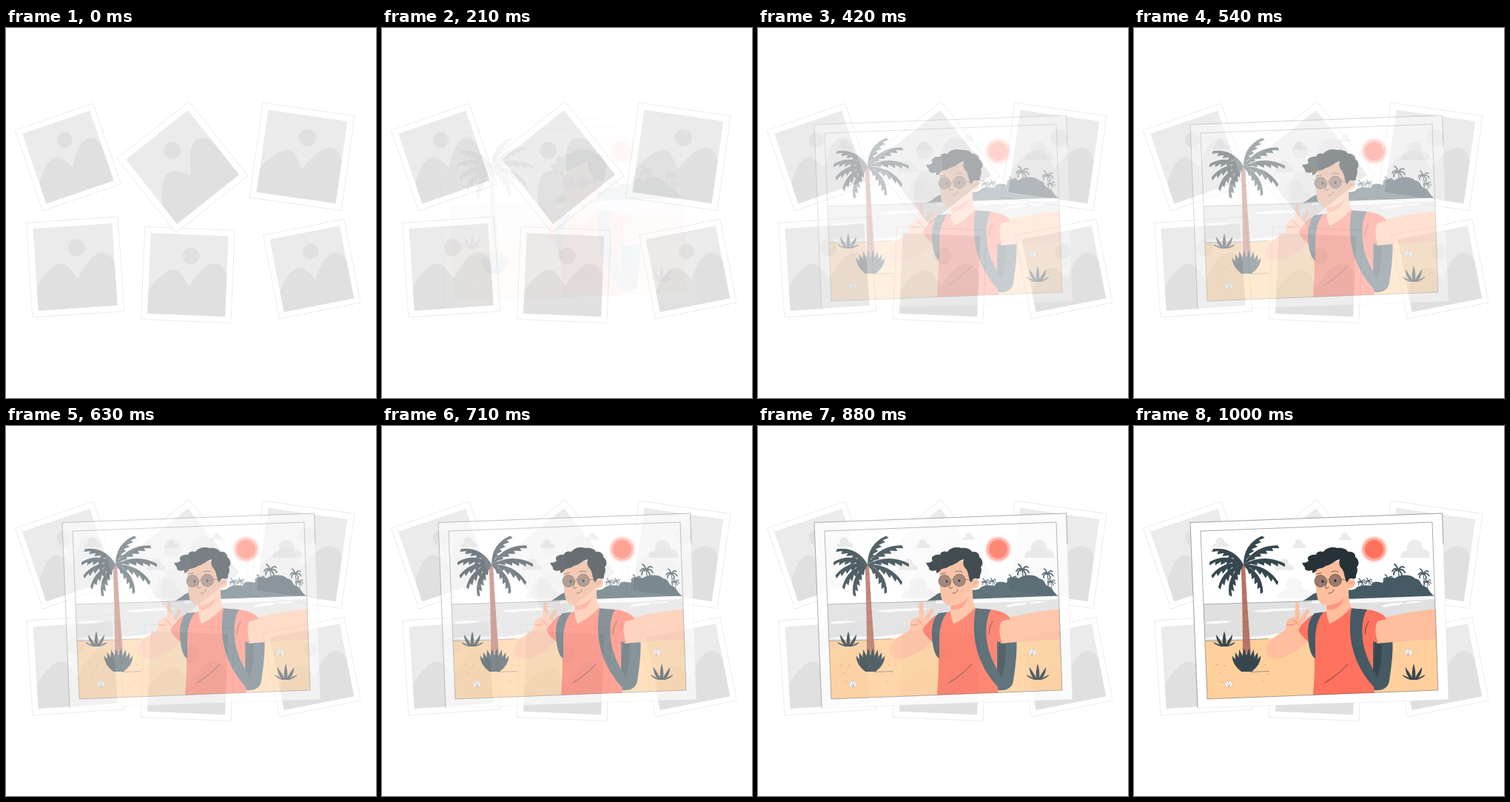
These frames come from a looping animation (500x500 px, 1040 ms). An HTML page:

```html
<!DOCTYPE html>
<html lang="en">
<head>
<meta charset="utf-8">
<title>Holiday photos</title>
<style>
  html, body { margin: 0; width: 100%; height: 100%; overflow: hidden; background: #fff; }
  svg { display: block; width: 100vw; height: 100vh; }
  #card { opacity: 0; animation: develop 1040ms linear infinite; }
  @keyframes develop {
    0% { opacity: 0; animation-timing-function: step-end; }
    19.71% { opacity: .05; animation-timing-function: steps(20, jump-none); }
    100% { opacity: 1; }
  }
  .ink { fill: #263238; }
  .leaf { fill: #37474f; }
  .slate { fill: #455a64; }
  .skin { fill: #ffbe9d; }
  .red { fill: #ff725e; }
  .line { fill: none; stroke: #263238; stroke-width: .7; stroke-linecap: round; stroke-linejoin: round; }
  .fold { stroke: #d9644f; }
  .edge { fill: none; stroke: #263238; stroke-width: .4; }
</style>
</head>
<body>
<svg viewBox="0 0 500 500" xmlns="http://www.w3.org/2000/svg">
  <defs>
    <g id="blank">
      <path d="M-62-64H62V64H-62Z" fill="#fff" stroke="#e0e0e0" stroke-width=".6"/>
      <path d="M-53.5-55.5H53.5V55.5H-53.5Z" fill="#ebebeb"/>
      <path d="M-53.5 24C-42 5-28-6-20-6C-10-6-5 6 2.5 16C12 0 24-17 37-17C46-17 51-9 53.5-2V55.5H-53.5Z" fill="#e0e0e0"/>
      <circle cx="3.4" cy="-26" r="11.5" fill="#e0e0e0"/>
    </g>
    <path id="cloud" d="M-20 12C-20 5-15 2-11 3C-12-7-8-12-1-12C7-12 10-7 10 1C16 0 20 4 20 12Z" fill="#ebebeb"/>
    <g id="tree" fill="none" stroke="#455a64" stroke-linecap="round">
      <path d="M0 0Q2 9 1 20" stroke-width="1.3"/>
      <path d="M0 0Q-4-5-8 1M0 0Q-6-1-6 6M0 0Q-2-7-5-8M0 0Q4-7 8-4M0 0Q6-3 9 3M0 0Q4 1 5 7" stroke-width="2"/>
    </g>
    <g id="shell">
      <path d="M-2 4C-7 0-5-3-3-3C-2-5 2-5 3-3C6-3 6 1 2 4Z" fill="#fff" stroke="#b8a898" stroke-width=".5"/>
      <path d="M0 4L-3-2M0 4V-4M0 4L3-2" stroke="#8c8178" stroke-width=".5"/>
    </g>
    <pattern id="hatch" width="2" height="2" patternUnits="userSpaceOnUse" patternTransform="rotate(30)">
      <path d="M0 0H2V1H0Z" fill="#ff725e"/>
    </pattern>
    <clipPath id="photo"><path d="M90 142L403 130L411 357L99 369Z"/></clipPath>
  </defs>

  <use href="#blank" transform="translate(83.8 174.5) rotate(-18.9) scale(.9)"/>
  <use href="#blank" transform="translate(400 173.8) rotate(8.1) scale(1.01)"/>
  <use href="#blank" transform="translate(93.5 323) rotate(-3.8)"/>
  <use href="#blank" transform="translate(245.8 333.5) rotate(2.4) scale(.98)"/>
  <use href="#blank" transform="translate(413.3 325.5) rotate(-11.2) scale(.9)"/>
  <use href="#blank" transform="translate(238.5 188) rotate(-38.4)"/>

  <g id="card">
    <path d="M76 130.5L416.5 118L425 369.5L86 381Z" fill="#fff" stroke="#e0e0e0" stroke-width=".5"/>
    <path class="edge" d="M86 381L76 130.5L416.5 118L418 160"/>
    <g clip-path="url(#photo)">
      <use href="#cloud" transform="translate(380 166)"/>
      <use href="#cloud" transform="translate(223 159) scale(.48)"/>
      <use href="#cloud" transform="translate(285 149) scale(.42)"/>
      <use href="#cloud" transform="translate(203 187) scale(.65)"/>
      <use href="#cloud" transform="translate(117 157) scale(.55)"/>
      <use href="#cloud" transform="translate(217 219) scale(1.15)" opacity=".45"/>

      <g class="red">
        <circle cx="324.5" cy="166.5" r="18" opacity=".2"/>
        <circle cx="324.5" cy="166.5" r="15.8" opacity=".5"/>
        <circle cx="324.5" cy="166.5" r="12.5"/>
      </g>

      <path d="M90 241L410 231V300H90Z" fill="#e0e0e0"/>
      <path class="line" d="M94 241L240 236.5" opacity=".5"/>
      <g fill="#fafafa">
        <path d="M240 237L406 231V234C372 235 350 238 332 238C300 240 270 238 240 240Z"/>
        <path d="M335 243Q350 238 366 239L358 242Q348 243 335 245ZM368 238Q382 236 392 237Q380 240 368 240Z"/>
        <path d="M160 250Q185 246 235 246Q210 251 190 250Q176 253 160 250ZM98 265Q112 262 133 264Q118 268 98 267Z"/>
        <path d="M94 287Q125 283 150 285Q180 284 214 277V288H94Z"/>
      </g>
      <path d="M228 236C238 232 240 226 251 224C270 218 292 224 299 220C306 213 315 216 320 216C323 208 331 211 336 212C338 203 348 203 352 206C357 201 373 199 380 206C388 207 387 214 391 216C398 217 399 226 406 229.5Z" class="slate"/>
      <use href="#tree" transform="translate(357 195)"/>
      <use href="#tree" transform="translate(391 200) scale(.85)"/>
      <use href="#tree" transform="translate(396 211) scale(.6)"/>
      <use href="#tree" transform="translate(343 207) scale(.75)"/>
      <use href="#tree" transform="translate(307 211) scale(.6)"/>
      <use href="#tree" transform="translate(317 210) scale(.55)"/>

      <path d="M90 290Q140 291 180 287L412 282V372H90Z" fill="#ffd09c"/>
      <path class="line" d="M94.5 290.5Q140 290 180 287.5" opacity=".5"/>
      <g id="pebbles" fill="#e58a62"></g>
      <path class="line" d="M158 332.5L182 331.5" opacity=".6"/>
      <use href="#shell" transform="translate(371 306) rotate(8)"/>
      <use href="#shell" transform="translate(128 349) rotate(-8)"/>

      <path d="M144.5 187H150Q153 245 158 307H147Q147 245 144.5 187Z" fill="#b67565"/>
      <path id="rings" stroke="#985e50" stroke-width=".5"/>
      <g id="plants" class="leaf"></g>

      <path class="slate" d="M322 289L349 287C351 305 347 331 345 345C343 354 336 358 324 357Z"/>
      <path class="leaf" d="M326 291H334C337 315 330 338 326 352L322 340Z"/>

      <path class="skin" d="M206 266C204 271 207 274 203 277C190 284 180 292 178 301C177 311 186 316 197 314C213 310 229 299 239 287L227 272C226 276 223 280 222 277C224 274 226 270 228 266C232 260 235 255 236.8 250.5C237 247 233.5 246.5 232 249.5L224.5 260L222.5 240C222 236.5 217.8 237 218 240.5L217.5 259C211 258 207 262 206 266Z"/>
      <path class="line fold" d="M207 268Q212 271 217 267M215 262Q220 264 222 269"/>

      <path class="skin" d="M325 262C350 256 380 249 415 247V288C385 289 355 291 328 294Z"/>
      <path class="red" d="M260 251C249 253 240 255 236 259C230 264 225 270 222 276C226 283 231 288 236 292L243 288C245 313 244 339 242 364L325 361C322 337 323 315 323 291L330 293C326 283 325 271 329 264Q335 262 341 261C340 256 330 250 318 248.5L291 246Z"/>
      <path class="skin" d="M260 236L290 219C290 229 290 239 294 246C286 254 275 264 264 268C261 263 260 257 260 251Z"/>
      <path d="M260 241C270 243 279 238 284 232C281 242 274 250 261 248Z" fill="url(#hatch)"/>
      <path class="line fold" d="M259 251Q261 261 264 268Q282 259 293 246"/>
      <path class="line" d="M289 322Q276 336 258 347M317 264Q312 272 312 281"/>

      <path class="slate" d="M244 253L256 251.5C249 259 245.5 272 245 286L245 314C238 311 235 293 235 278C235 268 238 259 244 253Z"/>
      <path class="slate" d="M294 246.500L315 248C306 262 307 289 313 306C317 319 325 334 333 344L329 357C313 343 300 321 295 299C291 282 291 263 294 246.500Z"/>

      <path class="skin" d="M246 190C244 205 246 219 247 228C248 238 254 243 262 242.5C276 241 286 230 289 219C295 221 299 217 299 211C298 206 292 206 289 209L285 180Z"/>
      <path class="line fold" d="M291 214Q293 210 296 211"/>
      <path class="ink" d="M227 184C230 186 234 184 236 182C232 177 239 173 246 174C247 169 253 169 256 170C260 164 269 163 275 165C282 164 288 167 289 170C295 169 300 173 299 177C304 180 305 187 301 191C304 196 299 201 300 205C297 208 296 206 293 206Q289 207 288 212C284 206 285 198 281 193C277 189 277 185 278 180C271 182 266 188 259 189C254 194 247 191 246 196L242 199C240 198 242 195 240 195C234 197 230 194 231 191Q228 188 227 184Z"/>
      <g fill="#9c7a6b" stroke="#263238" stroke-width=".5">
        <circle cx="252" cy="209.500" r="8"/>
        <circle cx="272" cy="208.5" r="8.3"/>
        <path d="M260 209Q262 206 264 208M280 207L291 209" fill="none"/>
      </g>
      <ellipse class="ink" cx="255" cy="210" rx="1.5" ry="2"/>
      <ellipse class="ink" cx="272" cy="209" rx="1.5" ry="2"/>
      <path class="line" d="M261 210Q258 216 259 219Q261 220 263 218M263 226Q268 227 270 221M247 200L253 198.5M267 197Q272 195 276 197"/>
    </g>
    <path class="edge" d="M90 142L403 130L411 357L99 369Z"/>
  </g>
</svg>
<script>
  const byId = id => document.getElementById(id);
  const range = (n, fn) => Array.from({ length: n }, (_, i) => fn(i));
  const polar = (deg, r) => [r * Math.cos(deg * Math.PI / 180), r * Math.sin(deg * Math.PI / 180)];

  // Palm leaf: a smooth arc above, broad overlapping leaflets below.
  function frond(x, y, deg, length, side) {
    const [tx, ty] = polar(deg, length);
    const nx = side * ty / length, ny = -side * tx / length;
    const bow = 15, teeth = 12, width = 10;
    const cx = tx / 2 + nx * bow, cy = ty / 2 + ny * bow;
    const at = (t, c, end) => 2 * t * (1 - t) * c + t * t * end;
    let d = `M${x} ${y}q${cx} ${cy} ${tx} ${ty}`;
    for (let i = teeth - 1; i > 0; i--) {
      const long = i % 2;
      const t = i / teeth + (long ? .08 : 0);
      const depth = width * Math.sin(Math.PI * i / teeth) ** .6 * (long ? 1 : .55);
      d += `L${x + at(t, cx, tx) - nx * depth} ${y + at(t, cy, ty) - ny * depth}`;
    }
    return `<path d="${d}Z"/>`;
  }

  // Pointed blades fanned around the vertical.
  function clump(x, y, count, height, spread, width) {
    return range(count, i => {
      const lean = spread * (2 * i / (count - 1) - 1);
      const reach = height * Math.cos(lean * .6 * Math.PI / 180);
      const [dx, dy] = polar(lean - 90, reach);
      const root = x + dx * .2, mx = x + dx * .7, my = y + dy * .45;
      return `<path d="M${root - width / 2} ${y}Q${mx - width} ${my} ${x + dx} ${y + dy}` +
        `Q${mx + width} ${my} ${root + width / 2} ${y}Z"/>`;
    });
  }

  byId('plants').innerHTML = [
    ...range(5, i => frond(148, 187, -57 + 28 * i, 46 + 10 * Math.sin(Math.PI * i / 4), 1)),
    ...range(5, i => frond(148, 187, 207 - 23 * i, 46, -1)),
    ...clump(152, 332, 8, 32, 42, 6),
    ...clump(122, 298, 5, 21, 68, 3.5),
    ...clump(378, 343, 5, 22, 66, 3.5)
  ].join('');

  byId('rings').setAttribute('d',
    range(8, i => `M${146 + i * .1} ${200 + 13 * i}h${5.5 + i * .6}`).join(''));

  byId('pebbles').innerHTML = range(7, i =>
    `<circle cx="${112 + i * 61.8 % 120}" cy="${322 + i * 23 % 34}" r=".8"/>`).join('');
</script>
</body>
</html>
```
